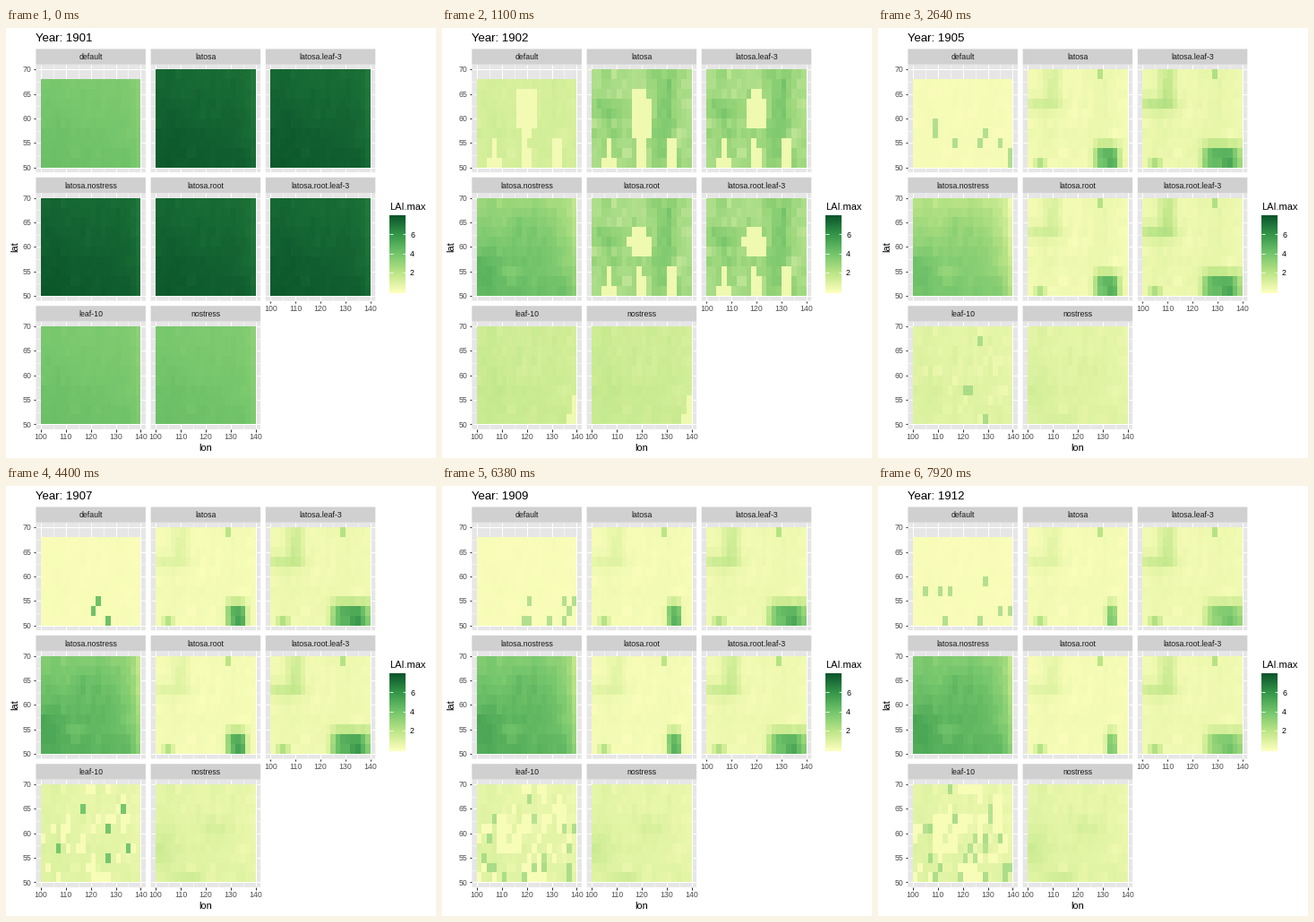
A matplotlib script that plays this animation: 480 px wide and 480 px high, repeating every 8000 ms.

```python
import numpy as np
import matplotlib.pyplot as plt
from matplotlib.animation import FuncAnimation
from matplotlib.collections import LineCollection
from matplotlib.colors import LinearSegmentedColormap
from matplotlib.patches import Rectangle

SIZE, DPI = 480, 96
STEP, TICK, LOOP = 220, 20, 8000
STEPS_PER_YEAR, YEARS = 99 / 29, 12
COLS, ROWS = 20, 10
X0, Y0, DX, DY = 38.9, 46.2, 128.2, 143.4   # first map corner, panel pitch
W, H = 111.5, 109.4                         # map size
PAD, STRIP = 5.5, 17.3
NAMES = ["default", "latosa", "latosa.leaf-3", "latosa.nostress", "latosa.root",
         "latosa.root.leaf-3", "leaf-10", "nostress"]

cmap = LinearSegmentedColormap.from_list("lai", [
    (1, 1, .745), (.745, .902, .53), (.46, .776, .424), (.21, .592, .29), (.04, .333, .165)])
c, r = np.meshgrid(np.arange(COLS), np.arange(ROWS))
u, v = c / (COLS - 1) - .5, r / (ROWS - 1) - .5


def noise(seed):
    """Cell noise of unit spread that varies softly between neighbours."""
    a = np.random.default_rng(seed).normal(size=(ROWS, COLS))
    a = a + np.roll(a, 1, 0) + np.roll(a, 1, 1)
    return a / a.std()


def bump(col, row, w, h):
    """Flat-topped hill."""
    return np.exp(-((c - col) / w) ** 4 - ((r - row) / h) ** 4)


def ellipse(col, row, w, h):
    return ((c - col) / w) ** 2 + ((r - row) / h) ** 2 < 1


def scatter(f, seed, count, value, top=0):
    """Put single lush cells at random, denser toward the east and south."""
    rng = np.random.default_rng(seed)
    cols = (COLS * rng.random(count) ** .6).astype(int)
    rows = top + ((ROWS - top) * rng.random(count) ** .7).astype(int)
    f[rows, cols] = value


grain = noise(4)
# Dry stripes along the south edge, wider toward the bottom.
stripes = (r >= 7) & (np.cos(2 * np.pi * (c - 3) / 6.3) > .3 + .25 * (9 - r))
south_east = c + r / 2 > 22.4


def lush(level):
    return level - .2 * u + .4 * v - .3 * np.exp(c - COLS + 1) + .05 * grain


def default(n):
    if n == 0:
        return lush(4)
    f = .25 + 1.75 * np.exp(1.5 * (1 - n)) * (1 + .05 * grain) + .03 * grain
    if n < 3:
        f[ellipse(9.5, 3.8, 2.2, 2.6) | stripes] = .4
    else:
        scatter(f, n, 4, 4.2, top=5)
    return f


def latosa(n, gap, spread=3.2, shrink=.2, base=.35, north=.5):
    if n == 0:
        return lush(7.55)
    f = base + (4 - base) * np.exp(1.5 * (1 - n)) + .06 * grain
    drought = np.exp(-((n - 2) / .7) ** 2)
    f += drought * (1.6 * bump(14, 4, 2.4, 6) + 1.2 * bump(3, 3.5, 4, 1) + .4 * grain)
    if n < 3:
        f[ellipse(*gap) | stripes] = .5
        return f
    corner = 4.6 * np.exp(-((n - 6) / 7) ** 2)
    f += corner * bump(15 + .12 * n, 9, spread - shrink * n, 1.9) * (1 + .08 * grain)
    fade = north + np.exp(2 - n)
    f += fade * (bump(4.5, 1, 1.6, 2) + bump(2.5, 3, 4, .9))
    return f + 1.8 * (bump(14, 0, .7, .7) + bump(2, 9, .7 + .1 * spread, .7))


def leaf3(n, gap):
    return latosa(n, gap, 4, 0, .5, 1)


def unstressed(n):
    if n == 0:
        return lush(7.6)
    dip = np.exp(-((n - 3) / 1.5) ** 2)
    f = 4.2 - 1.5 * dip - .5 * u + (1.3 + .5 * dip) * v
    f += .5 * bump(10, 3, 4.5, 3) + .5 * bump(0, 6.5, 3, 2) - .4 * bump(6.5, 7, 2, .7)
    return f - 1.3 * np.exp((c - COLS + 1) / 1.3) * (n > 1) + .12 * grain


def grass(n):
    if n == 0:
        return lush(4)
    f = .85 + 1.05 * np.exp(1 - n) - .2 * u + .1 * v + .09 * grain
    if n < 3:
        f[south_east] = .5
    return f


def leaf10(n):
    f = grass(n)
    if n > 3:
        f[noise(8) + 1.5 * bump(10, 5, 8, 3) > 2.6 - .15 * n] = .25
        scatter(f, 20 + n, n, 4)
    return f


def nostress(n):
    f = grass(n)
    if n > 3:
        f += .5 * (bump(11, 4, 3, 1) + bump(0, 6, 2.5, 2) + bump(6, 9, 3, .6))
    return f


TALL, SHORT, SLIM = (9.3, 4.2, 2.3, 3), (9.2, 4.2, 2.4, 1.7), (9.5, 3.7, 2.2, 2.3)
MODELS = [default, lambda n: latosa(n, TALL), lambda n: leaf3(n, SLIM), unstressed,
          lambda n: latosa(n, SHORT), lambda n: leaf3(n, SHORT), leaf10, nostress]
colors = np.array([[cmap(np.clip(model(n) / 8, 0, 1))[..., :3] for n in range(YEARS)]
                   for model in MODELS])
keys = np.round(np.arange(YEARS) * STEPS_PER_YEAR)

fig = plt.figure(figsize=(SIZE / DPI, SIZE / DPI), dpi=DPI, facecolor="white")
ax = fig.add_axes([0, 0, 1, 1])
ax.axis("off")
PT = 72 / DPI


def label(x, y, s, size=8.8, color="black", **kw):
    return ax.text(x, y, s, fontsize=size * PT, color=color, family="Liberation Sans", **kw)


def box(x, y, w, h, color):
    ax.add_patch(Rectangle((x, y), w, h, fc=color, lw=0, snap=False))


def lines(segments, color, width):
    ax.add_collection(LineCollection(segments, colors=color, linewidths=width * PT))


images, major, minor, ticks = [], [], [], []
for n, name in enumerate(NAMES):
    row, col = divmod(n, 3)
    x, y = X0 + col * DX, Y0 + row * DY
    left, right, top, bottom = x - PAD, x + W + PAD, y - PAD, y + H + PAD
    box(left, top, right - left, bottom - top, "#e6e6e6")
    box(left, top - STRIP, right - left, STRIP, "#d0d0d0")
    label((left + right) / 2, top - STRIP / 2 + 3.1, name, color="#1a1a1a", ha="center")
    for i in range(9):
        gx, gy = x + W * i / 8, y + H * i / 8
        grid = minor if i % 2 else major
        grid += [[(gx, top), (gx, bottom)], [(left, gy), (right, gy)]]
        if i % 2 == 0 and n >= 5:
            ticks.append([(gx, bottom), (gx, bottom + 2.8)])
            label(gx, bottom + 11.2, 100 + 5 * i, color="#4d4d4d", ha="center")
        if i % 2 == 0 and col == 0:
            ticks.append([(left - 2.8, gy), (left, gy)])
            label(left - 4.8, gy + 3.1, 70 - 5 * i // 2, color="#4d4d4d", ha="right")
    first = 1 if name == "default" else 0   # this map has no northernmost row
    xa, xb = round(x), round(x + W)
    ya, yb = round(y + H * first / ROWS), round(y + H)
    ci = ((np.arange(xa, xb) + .5 - x) / W * COLS).astype(int).clip(0, COLS - 1)
    ri = ((np.arange(ya, yb) + .5 - y) / H * ROWS).astype(int).clip(first, ROWS - 1)
    blank = np.zeros((yb - ya, xb - xa, 3), np.uint8)
    image = fig.figimage(blank, xa, SIZE - yb, origin="upper", zorder=5)
    images.append((image, np.ix_(ri, ci)))
lines(minor, "white", .53)
lines(major, "white", 1.07)
lines(ticks, "#333333", 1.07)

title = label(33.4, 15, "", 13.2)
label(222.8, 472, "lon", 11, ha="center")
label(13, 244.3, "lat", 11, ha="center", rotation=90, rotation_mode="anchor")

BAR_X, BAR_Y, BAR_W, BAR_H = 428, 209, 18, 87
label(BAR_X + .5, 203, "LAI.max", 11)
ax.imshow(np.linspace(1, 0, 256)[:, None], cmap=cmap, aspect="auto",
          extent=(BAR_X, BAR_X + BAR_W, BAR_Y + BAR_H, BAR_Y))
ax.set(xlim=(0, SIZE), ylim=(SIZE, 0))
for value in (2, 4, 6):
    y = 251.8 + 10.7 * (4 - value)
    lines([[(BAR_X, y), (BAR_X + 3.5, y)],
           [(BAR_X + BAR_W - 3.5, y), (BAR_X + BAR_W, y)]], "white", .8)
    label(BAR_X + BAR_W + 5, y + 3.1, value)


def update(i):
    step = i * TICK // STEP
    title.set_text(f"Year: {round(1901 + step / STEPS_PER_YEAR)}")
    k = np.searchsorted(keys, step, "right")
    t = (step - keys[k - 1]) / (keys[k] - keys[k - 1])
    for (image, cells), shades in zip(images, colors):
        mix = (1 - t) * shades[k - 1] + t * shades[k]
        image.set_data((mix * 255).round().astype(np.uint8)[cells])
    return [title] + [image for image, _ in images]


anim = FuncAnimation(fig, update, frames=LOOP // TICK, interval=TICK,
                     repeat=True, repeat_delay=0, blit=False)
plt.show()
```
